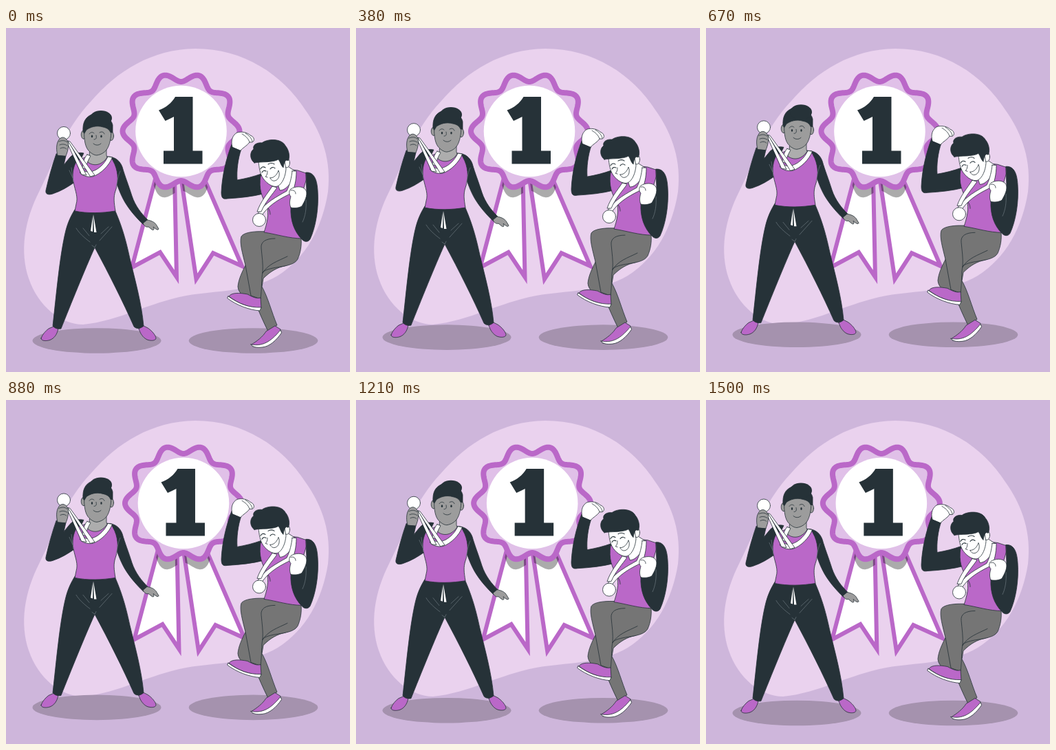
Animation, 500 px wide and 500 px high, one loop 1540 ms. Source, as an HTML page with a canvas:

```html
<!DOCTYPE html>
<html lang="en">
<head>
<meta charset="utf-8">
<title>First place</title>
<style>
  html, body { margin: 0; width: 100%; height: 100%; overflow: hidden; background: #ceb6db; }
  canvas { display: block; width: 500px; height: 500px; }
</style>
</head>
<body>
<canvas id="stage" width="500" height="500"></canvas>
<script>
const ctx = document.getElementById('stage').getContext('2d');
const LOOP = 1540, STEPS = 37;
const INK = '#263238', PURPLE = '#ba68c8', WHITE = '#fff', TROUSERS = '#757575';
const SKIN = '#9c9c9c', NECK = '#adadad', FOLD = '#78838a';

function shape(d, fill, line = INK, width = 0.8) {
  const path = new Path2D(d);
  if (fill) { ctx.fillStyle = fill; ctx.fill(path); }
  if (line) { ctx.strokeStyle = line; ctx.lineWidth = width; ctx.stroke(path); }
}
const line = (d, color = INK, width = 0.8) => shape(d, null, color, width);

function oval(x, y, rx, ry, fill, stroke) {
  ctx.beginPath();
  ctx.ellipse(x, y, rx, ry, 0, 0, Math.PI * 2);
  ctx.fillStyle = fill;
  ctx.fill();
  if (stroke) { ctx.strokeStyle = stroke; ctx.lineWidth = 0.8; ctx.stroke(); }
}

// Ten-lobed rosette around the origin.
function rosette() {
  const path = new Path2D();
  for (let i = 0; i < 360; i++) {
    const a = i * Math.PI / 180;
    const r = 78.5 + 6.5 * Math.cos(10 * a);
    path.lineTo(r * Math.cos(a), r * Math.sin(a));
  }
  path.closePath();
  return path;
}
const ROSETTE = rosette();
const RIBBONS = [
  'M219 212 L183 348 L224 326 L248 362 L245 215 Z',
  'M254 215 L276.5 365 L301 327 L343 346 L285 212 Z'
];

function backdrop() {
  ctx.fillStyle = '#ceb6db';
  ctx.fillRect(0, 0, 500, 500);
  shape('M275 30 C346 30 402 68 435 119 C461 155 473 195 468 238 C460 290 436 334 395 360 ' +
    'C354 384 308 381 262 389 C208 399 164 426 112 431 C80 431 47 405 33 364 ' +
    'C20 325 26 281 49 236 C74 186 87 145 124 106 C162 62 212 31 275 30 Z', '#ead2ee', null);
}

function badge(dx) {
  ctx.save();
  ctx.translate(dx, 0);
  ctx.lineJoin = 'miter';
  for (const d of RIBBONS) {
    shape(d, WHITE, PURPLE, 6);
    ctx.save();
    ctx.clip(new Path2D(d));
    ctx.translate(254.5, 160);
    ctx.scale(1.06, 1.06);
    ctx.fillStyle = 'rgba(0,0,0,.33)';
    ctx.fill(ROSETTE);
    ctx.restore();
  }
  ctx.lineJoin = 'round';
  ctx.save();
  ctx.translate(254.5, 150);
  ctx.fillStyle = '#e0c0e8';
  ctx.fill(ROSETTE);
  ctx.strokeStyle = PURPLE;
  ctx.lineWidth = 8;
  ctx.stroke(ROSETTE);
  ctx.restore();
  oval(254.5, 150, 66.3, 66.3, WHITE);
  shape('M246 100 H271.5 V178.5 H285.5 V197.5 H229 V178.5 H244 V129 C240 131 236 133 231.5 135 ' +
    'L222 119.5 C232 116 241 109 246 100 Z', INK, null);
  ctx.restore();
}

function womanBody() {
  shape('M51 451 C53 445 58 440 62 437 L69 434 L76 437 C74 446 70 451 64 453.5 C58 455.5 51 455 51 451 Z', PURPLE);
  shape('M193 437 L200 433 L206 436 C212 440 217 446 218 450.5 C218 455 210 455 205 453 C199 450 195 444 193 437 Z', PURPLE);
  shape('M100 264 C95 272 90 282 87 294 C78 330 73 390 68 433 C71 437 76 438 80 437 ' +
    'C94 402 115 350 129 319 C150 358 170 398 186 434 C190 438 196 437 200 433 ' +
    'C197 400 188 368 180 335 C173 302 167 285 158 264 Z', INK);
  line('M102 291 C106 298 114 305 122 311 M112 291 L121 302 M154 289 L136 309 M149 289 L138 299', FOLD, 0.6);
  line('M125 316 L129 319 L131 315', FOLD, 0.6);
  shape('M126.5 271 L123 295 L126 296 Z M127 271 L128 297 L131.5 297 Z', WHITE, null);

  shape('M150 187 C160 188 166 194 169 202 C173 216 178 228 183 244 C188 259 197 270 206 279 ' +
    'L200 286 C188 275 176 260 170 248 C165 238 161 228 158 214 L150 200 Z', INK);
  shape('M73 183 C67 200 62 218 58 236 C57 242 62 243 68 241 C80 237 90 231 100 224 ' +
    'L106 196 L113 182 C105 180 98 183 93 188 L84 199 L87 186 Z', INK);
  shape('M103 193 C97 202 96 214 98 224 C101 238 105 246 102 256 L100 266 C119 270 140 269 159 266 ' +
    'C157 254 156 246 159 237 C163 226 164 212 158 198 L153 188 L147 187 L118 187 Z', PURPLE);
  line('M95 203 C96 210 97 218 98 224 M92 207 L97 218 M160 232 C162 222 163 214 166 208', FOLD, 0.6);

  shape('M199 284 L205 279 C212 280 217 283 219 287 L222 292 C221 295 217 292 214 289 ' +
    'C216 292 215 295 212 293 L207 289 C204 290 201 288 199 284 Z', SKIN);
  shape('M122 168 L121 187 C119 190 118 193 119 195 C128 202 140 199 147 188 L146 185 V168 Z', NECK);
}

function womanHead() {
  oval(113, 155, 3.8, 6.3, SKIN, INK);
  oval(153, 157, 3.6, 6.5, SKIN, INK);
  shape('M114 142 C113 158 114 170 119 177 C123 182 128 185 132 185 C139 184 145 180 148 174 ' +
    'C152 166 153 156 153 144 C145 134 122 134 114 142 Z', SKIN);
  shape('M112 151 C111 138 115 130 124 126 C136 122 153 130 155 141 L155 152 L152 152 ' +
    'C150 147 146 145 141 144 C131 141 123 144 117 148 L114 153 Z', INK);
  oval(138, 131, 16, 11, INK);
  line('M121 154 C123 151 126 151 128 153 M136 152 C139 150 142 151 143 154');
  oval(125, 157.5, 1.2, 1.9, INK);
  oval(138.5, 157.5, 1.2, 1.9, INK);
  line('M131 156 C132 160 131 162 128 162 M127 168 C130 171 135 171 138 168');
}

function womanMedal() {
  shape('M118 184 L123 186 C119 193 116 199 117 206 L111 203 C112 195 114 188 118 184 Z', WHITE);
  shape('M148 187 L154.5 188 C150 200 138 212 126 216 C118 217 111 215 107 210 L114 208 C126 213 142 201 148 187 Z', WHITE);
  shape('M88 164 L92 166 L117 214 L110 213 Z', WHITE);
  shape('M90 164 L93 165 L129 214 L123 216 Z', WHITE);
  oval(84, 153, 9.5, 9.5, WHITE, INK);
  shape('M75 185 C73 178 73 169 76 164 C79 158 84 158 87 161 L90 165 C91 170 91 177 87 186 Z', SKIN);
  line('M77 165 C81 163 86 163 89 166 M78 170 C82 168 86 169 89 171 M79 175 C83 173 86 174 88 176');
}

function manLegs() {
  shape('M428 312 C428 328 424 340 405 346 C395 348 385 353 374 364 L372 376 C381 392 386 413 394 432 ' +
    'L381 441 C374 427 367 411 362 398 C350 392 338 388 337 376 C338 365 343 355 349 343 Z', TROUSERS);
  shape('M357 460 C365 455 373 449 378 441 L391 433 L399 438 C396 449 386 460 375 463 L359 463 Z', PURPLE);
  shape('M356 460 C376 464 388 452 399 439 L400.5 443 C393 454 383 463 373 464 C365 465 358 464 356 460 Z', WHITE);
  shape('M378 296 C361 295 346 297 342 303 C339 312 344 328 348 345 L356 389 L370 394 ' +
    'C372 378 371 364 373 355 C384 345 416 350 424 336 C428 327 430 316 429 306 Z', TROUSERS);
  line('M391 306 C377 306 370 311 371 320 C372 332 374 343 373 356');
  line('M373 356 C381 343 395 339 409 332');
  shape('M324 390 C328 384 340 385 351 387 C358 391 365 394 370 392 L371 407 C354 407 338 401 324 390 Z', PURPLE);
  shape('M323 390 C338 401 354 407 371 406 L369 411 C354 410 335 403 322 393 Z', WHITE);
}

function manBody() {
  shape('M371 212 C360 216 348 219 336 221 C335 208 337 190 342 176 L328 169 ' +
    'C320 190 314 215 313 239 C313 248 316 249 322 248 C340 247 358 245 374 241 Z', INK);
  shape('M329 173 C326 163 330 155 336 152 C343 150 351 152 355 156 C361 158 362 164 358 166 ' +
    'L354 166 C351 171 344 174 341 178 Z', WHITE);
  line('M343 154 C348 157 352 160 354 166 M348 153 C353 156 357 160 358 165');
  shape('M370 215 C367 234 372 246 379 258 C383 271 379 285 375 297 C394 300 412 306 430 306 ' +
    'L424 262 L439 212 L424 207 C408 204 384 210 370 215 Z', PURPLE);
  line('M378 258 C382 262 384 266 384 271');
  shape('M394 224 L398 236 C408 236 418 222 420 208 L408 200 Z', WHITE);
  shape('M416 208 L422 208 C422 222 419 234 415 240 C401 247 384 255 372 272 L366 270 ' +
    'C376 254 394 245 408 237 C413 227 415 217 416 208 Z', WHITE);
  shape('M387 230 L394 232 C388 241 376 254 371 267 L365 267 C370 252 380 241 387 230 Z', WHITE);
  oval(368, 279, 9.5, 9.5, WHITE, INK);
  shape('M436 210 C447 209 452 219 453 236 C455 262 450 290 442 307 C439 312 433 311 430 307 ' +
    'C419 296 413 280 414 260 L430 257 L437 240 Z', INK);
  shape('M414 261 C411 255 413 249 414 245 C411 242 411 237 414 234 C420 230 432 229 436 236 ' +
    'C439 243 434 252 430 259 C425 262 418 262 414 261 Z', WHITE);
  line('M414 236 C418 235 421 237 421 241');
  line('M436 250 C437 262 435 274 431 282', FOLD, 0.6);
}

function manHead() {
  oval(408, 196, 4.5, 7, WHITE, INK);
  shape('M367 194 C368 203 369 212 374 219 C380 227 388 232 395 230 C402 226 406 216 407 205 L404 188 L380 186 Z', WHITE);
  shape('M361 196 C354 191 354 180 360 176 C358 170 365 166 372 167 C380 161 400 160 406 171 ' +
    'C412 178 413 189 410 193 C406 190 404 196 403 203 C399 199 399 195 396 191 ' +
    'C388 196 370 194 361 196 Z', INK);
  line('M370 205 C371 202 374 201 377 203 M381 198 C384 196 388 196 390 198', INK, 1.1);
  line('M372 210 C373 207 376 207 378 208 M384 205 C386 202 389 202 391 204', INK, 1.1);
  line('M380 208 C380 212 379 215 377 216 L380 217');
  shape('M384 218 C390 218 394 213 396 207 C399 214 396 221 391 222 C388 223 385 221 384 218 Z', WHITE);
}

function people(dy) {
  ctx.save();
  ctx.translate(0, dy);
  oval(132, 454.5, 93.5, 18.3, '#a592ae');
  oval(359.5, 454.5, 93.8, 18.3, '#a592ae');
  womanBody();
  womanHead();
  womanMedal();
  manLegs();
  manBody();
  manHead();
  ctx.restore();
}

// CSS "ease" curve, cubic-bezier(.25, .1, .25, 1).
function ease(x) {
  const bezier = (a, b, u) => 3 * a * u * (1 - u) ** 2 + 3 * b * u * u * (1 - u) + u ** 3;
  let low = 0, high = 1;
  for (let i = 0; i < 20; i++) {
    const mid = (low + high) / 2;
    if (bezier(0.25, 0.25, mid) < x) low = mid; else high = mid;
  }
  return bezier(0.1, 1, low);
}

const SHAKE = [0, -1, 2, -4, 4, -4, 4, -4, 2, -1, 0];
function shake(p) {
  const i = Math.min(9, Math.floor(p * 10));
  return 0.78 * (SHAKE[i] + (SHAKE[i + 1] - SHAKE[i]) * ease(p * 10 - i));
}
const float = p => -10 * (1 - Math.abs(1 - 2 * p));

function draw(ms) {
  const step = Math.floor((ms % LOOP) / LOOP * STEPS + 0.1) % STEPS;
  const p = (step + 1) / STEPS;
  ctx.lineJoin = ctx.lineCap = 'round';
  backdrop();
  badge(shake(p) + 0.35);
  people(float(p) + 0.5);
}

let start = null;
function tick(now) {
  if (start === null) start = now;
  draw(Math.max(0, now - start));
  requestAnimationFrame(tick);
}
draw(0);
requestAnimationFrame(tick);
</script>
</body>
</html>
```
